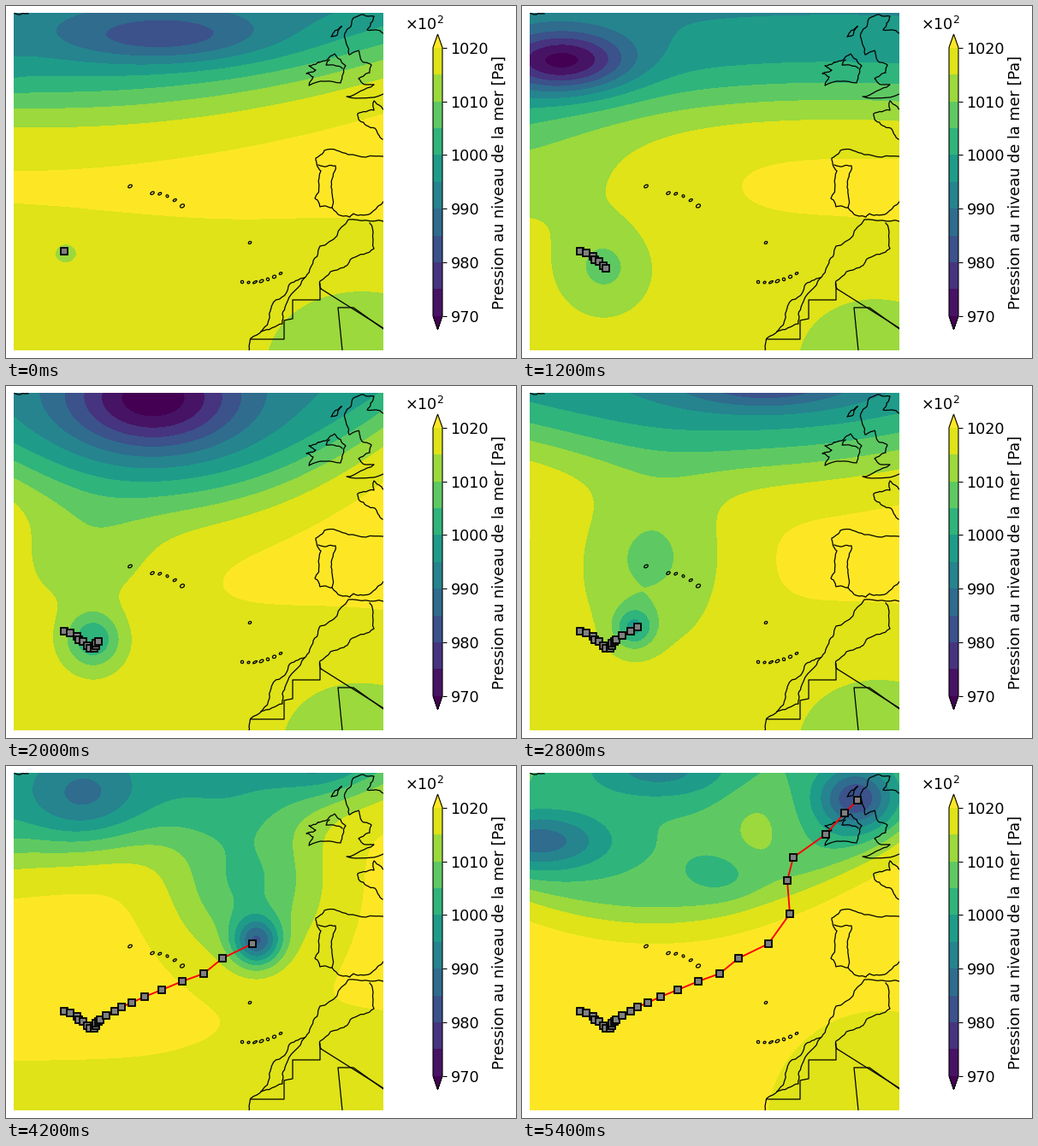
These frames come from a looping animation (596 by 412 pixels, 5.6 s). A matplotlib script:

```python
import numpy as np
import matplotlib.pyplot as plt
from matplotlib.animation import FuncAnimation
from matplotlib.patches import Ellipse

W, H, N = 596, 412, 28
X0, X1, Y0, Y1 = 9, 441, 8, 403
FONT = 17.6
LEVELS = np.arange(970, 1021, 5)
HIGH = 1022
rng = np.random.default_rng(4)

# Storm centre, one fix per step
TRACK = np.array([
    (68, 287), (75, 289), (83, 293), (85, 297), (90, 299), (95, 304), (98, 307),
    (103, 307), (105, 304), (105, 301), (108, 299), (110, 297), (117, 292),
    (127, 287), (135, 282), (147, 277), (162, 270), (182, 262), (206, 252),
    (231, 243), (253, 225), (288, 208), (313, 173), (310, 134), (317, 107),
    (355, 80), (377, 55), (392, 40)])

# Zonal flow: step, northern drop, front y, tilt, bend, width, southern drop, its y, its tilt
FLOW = [
    (0, 30, 97, -28, -17, 28, 5.5, 270, 12),
    (6, 28, 108, -18, 14, 28, 5, 255, 30),
    (10, 28, 132, -28, -63, 28, 5, 270, 25),
    (14, 28, 85, 6, -24, 28, 5, 270, 15),
    (18, 28, 90, -35, -40, 20, 8, 318, -8),
    (23, 20, 55, -46, 11, 25, 0, 330, 0),
    (27, 16, 175, -38, -58, 14, 0, 330, 0),
]

# Lows: step, x, y, depth, x radius, y radius (the storm's x, y are relative to its track)
STORM = [(0, 2, 0, 4, 25, 22), (6, -2, -1, 8.4, 50, 50), (10, -6, -2, 17, 33, 33),
         (14, -4, 1, 16, 24, 24), (18, -2, 1, 20, 22, 22), (23, 10, -4, 33, 33, 33),
         (27, -2, -2, 18, 40, 34)]
TROUGH = [(0, 20, 190, 0, 140, 70), (6, 40, 200, 5, 140, 70), (10, 90, 200, 8, 90, 65),
          (14, 150, 200, 12, 95, 90), (18, 225, 160, 13, 85, 85), (23, 320, 125, 20, 95, 95),
          (27, 390, 40, 8, 60, 55)]
DESERT = [(0, 420, 420, 4, 120, 120), (14, 420, 420, 4, 120, 120), (18, 420, 420, 0, 140, 140),
          (23, 420, 420, 5, 140, 140)]
POLAR = [
    [(0, 185, 36, 13, 115, 30), (6, 360, -60, 8, 115, 30)],
    [(0, -130, 80, 28, 75, 35), (6, 48, 65, 28, 75, 35), (10, 172, 15, 28, 100, 60),
     (14, 285, -5, 17, 100, 30), (18, 420, -120, 10, 80, 30)],
    [(14, 230, 130, 0, 40, 40), (18, 283, 90, 14, 55, 42), (23, 430, -80, 8, 60, 40)],
    [(14, 30, -80, 8, 90, 40), (18, 60, 5, 7, 90, 25), (23, 112, 60, 15, 48, 70),
     (27, 235, 126, 4.5, 40, 26)],
    [(18, -130, 60, 4, 80, 35), (23, -80, 70, 4, 80, 35), (27, 20, 88, 19, 80, 35)],
    [(23, 100, -80, 8, 90, 35), (27, 160, 5, 13, 90, 35)],
    [(23, 240, 40, 0, 45, 60), (27, 275, 75, -5, 45, 60)],
]

# Coast key points; the jagged detail is seeded
BRITAIN = [(441, 32), (422, 28), (430, 12), (406, 14), (396, 32), (401, 57), (412, 52), (418, 66),
           (427, 69), (425, 78), (412, 85), (420, 92), (430, 92), (398, 106), (441, 103)]
HEBRIDES = [(392, 24), (380, 36), (387, 34), (392, 24)]
IRELAND = [(365, 66), (384, 56), (397, 70), (391, 90), (354, 93), (359, 83), (351, 79),
           (362, 75), (354, 70), (365, 66)]
ULSTER = [(378, 63), (374, 69), (393, 73)]
BRITTANY = [(441, 121), (430, 111), (430, 122), (411, 126), (413, 134), (431, 143), (440, 156)]
IBERIA = [(441, 176), (400, 174), (372, 169), (362, 178), (368, 193), (361, 225), (367, 235),
          (381, 236), (394, 246), (402, 247), (406, 243), (428, 241), (441, 229)]
PORTUGAL = [(365, 186), (385, 187), (380, 212), (381, 236)]
AFRICA = [(441, 252), (400, 250), (367, 281), (357, 304), (349, 318), (330, 328), (311, 350),
          (308, 365), (286, 389), (284, 403)]
ATLAS = [(425, 254), (430, 284), (405, 295), (395, 306), (367, 322), (368, 331)]
DUNES = [(349, 318), (327, 350), (323, 372), (298, 381)]
ICELAND = [(9, 8), (14, 10), (26, 9)]
COASTS = [BRITAIN, HEBRIDES, IRELAND, ULSTER, BRITTANY, IBERIA, PORTUGAL, AFRICA, ATLAS,
          DUNES, ICELAND]
BORDERS = [
    [(367, 325), (367, 344), (335, 344), (335, 366), (325, 368), (325, 390), (286, 390)],
    [(368, 331), (441, 377)],
    [(393, 403), (388, 353), (406, 353), (441, 378)],
]
# Island arcs: start x, y, end x, y, sag, count
ARCS = [(145, 211, 145, 211, 0, 1), (171, 219, 206, 234, -4, 5),
        (285, 277, 285, 277, 0, 1), (276, 323, 321, 313, 4, 7)]


def roughen(line, levels=3, amount=0.13):
    """Fractal midpoint displacement along a polyline."""
    line = np.array(line, float)
    for _ in range(levels):
        step = np.diff(line, axis=0)
        normal = step[:, ::-1] * (-1, 1)
        mid = line[:-1] + step / 2 + normal * rng.uniform(-amount, amount, (len(step), 1))
        out = np.empty((2 * len(line) - 1, 2))
        out[::2], out[1::2] = line, mid
        line = out
    return line


def pose(rows, i):
    steps, *cols = zip(*rows)
    return [np.interp(i, steps, col) for col in cols]


def sigmoid(z):
    return 1 / (1 + np.exp(-z))


def dip(rows, i, base=(0, 0)):
    x, y, depth, rx, ry = pose(rows, i)
    return depth * np.exp(-((gx - x - base[0]) / rx)**2 - ((gy - y - base[1]) / ry)**2)


def pressure(i):
    north, y, tilt, bend, width, south, ys, stilt = pose(FLOW, i)
    p = HIGH - north * sigmoid((y + tilt * u + bend * u**2 - gy) / width)
    p -= south * sigmoid((gy - ys - stilt * u) / 32)
    p -= dip(STORM, i, TRACK[i])
    for low in [TROUGH, DESERT, *POLAR]:
        p -= dip(low, i)
    return p


def box(x0, y0, x1, y1):
    return [x0 / W, 1 - y1 / H, (x1 - x0) / W, (y1 - y0) / H]


def fill(i):
    return ax.contourf(gx, gy, pressure(i), LEVELS, cmap="viridis", extend="both", zorder=1)


gx, gy = np.meshgrid(np.linspace(X0, X1, 145), np.linspace(Y0, Y1, 133))
u = (gx - (X0 + X1) / 2) / ((X1 - X0) / 2)

plt.rcParams["font.family"] = "DejaVu Sans"
fig = plt.figure(figsize=(W / 72, H / 72), dpi=72, facecolor="white")
ax = fig.add_axes(box(X0, Y0, X1, Y1))
ax.set_xlim(X0, X1)
ax.set_ylim(Y1, Y0)
ax.axis("off")

for line in [roughen(c) for c in COASTS] + [np.array(b) for b in BORDERS]:
    ax.plot(*line.T, color="black", lw=1.25, zorder=3)
for xa, ya, xb, yb, sag, n in ARCS:
    for t in np.linspace(0, 1, n):
        w, h = rng.uniform(2.5, 5.5, 2)
        spot = xa + (xb - xa) * t, ya + (yb - ya) * t + 4 * sag * t * (1 - t)
        ax.add_patch(Ellipse(spot, w, h * 0.7, angle=-30, fill=False, ec="black",
                             lw=1.25, zorder=3))

path, = ax.plot([], [], color="red", lw=1.9, marker="s", ms=8.3, mfc="gray",
                mec="black", mew=1.8, zorder=5)

shade = fill(0)
cax = fig.add_axes(box(499, 33, 510, 378.6))
bar = fig.colorbar(shade, cax=cax, ticks=range(970, 1021, 10))
bar.outline.set_linewidth(1.1)
cax.tick_params(labelsize=FONT, length=4.5, width=1.1, pad=5)
fig.text(465.5 / W, 1 - 28 / H, r"$\mathdefault{\times10^{2}}$", fontsize=FONT,
         ha="left", va="baseline")
fig.text(576.5 / W, 1 - 206.5 / H, "Pression au niveau de la mer [Pa]", fontsize=FONT,
         rotation=90, ha="center", va="center")


def update(i):
    global shade
    shade.remove()
    shade = fill(i)
    path.set_data(*TRACK[:i + 1].T)
    return [path]


anim = FuncAnimation(fig, update, frames=N, interval=200, repeat=True, repeat_delay=0)
plt.show()
```
